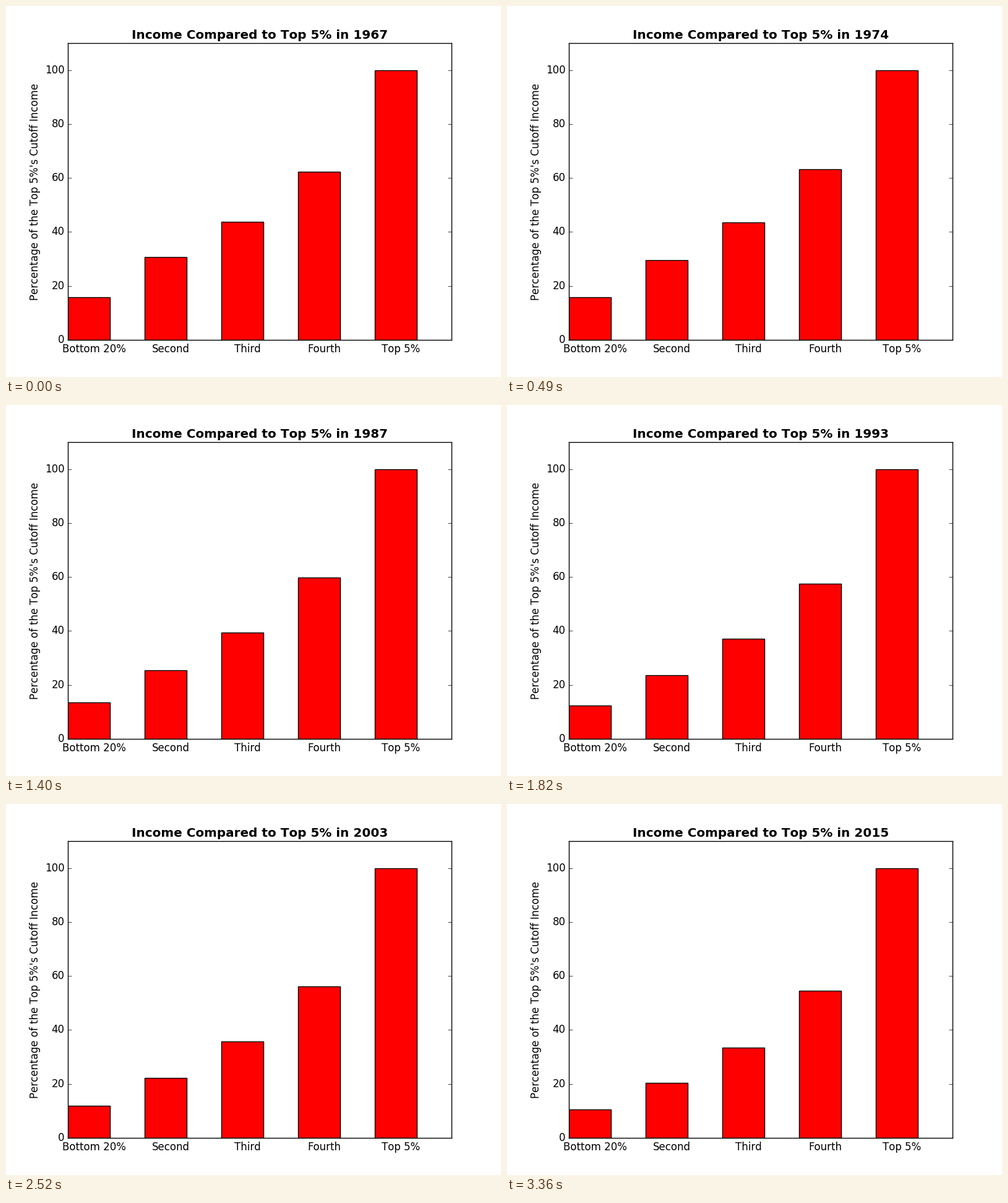
These frames come from a looping animation (800x600 px, 5950 ms). A matplotlib script:

```python
import numpy as np
import matplotlib.pyplot as plt
from matplotlib.animation import FuncAnimation

plt.style.use("classic")
plt.rcParams["font.family"] = "DejaVu Sans"
plt.rcParams["text.kerning_factor"] = 6  # kerning in whole pixels

FIRST, LAST = 1967, 2015
STEP_MS, FRAMES = 70, 85

# Turning points of each group, in percent of the top cutoff;
# the bars move in straight lines between them.
YEARS = [1967, 1968, 1974, 1981, 1993, 1998, 2008, 2015]
GROUPS = {
    "Bottom 20%": [15.79, 16.7, 15.8, 14.45, 12.39, 12.19, 11.51, 10.63],
    "Second": [30.7, 31.7, 29.55, 27.25, 23.58, 23.0, 21.67, 20.29],
    "Third": [43.72, 45.5, 43.5, 41.9, 37.07, 36.56, 34.85, 33.57],
    "Fourth": [62.32, 63.9, 63.2, 62.1, 57.57, 56.73, 55.69, 54.56],
    "Top 5%": [100] * len(YEARS),
}


def heights(year):
    return [np.interp(year, YEARS, points) for points in GROUPS.values()]


fig = plt.figure(figsize=(8, 6), dpi=100, facecolor="white")
ax = fig.add_axes([0.125, 0.1, 0.775, 0.8])
slots = np.arange(len(GROUPS))
bars = ax.bar(slots, heights(FIRST), width=0.55, align="edge",
              color="red", edgecolor="black", linewidth=1)
ax.set_xlim(0, 5)
ax.set_ylim(0, 110)
ax.set_xticks(slots + 0.34, list(GROUPS))
ax.set_yticks(range(0, 101, 20))
ax.tick_params(axis="x", bottom=False, top=False)
ax.set_ylabel("Percentage of the Top 5%'s Cutoff Income")
title = ax.set_title("", fontweight="bold")


def draw(i):
    year = min(FIRST + i, LAST)
    for bar, height in zip(bars, heights(year)):
        bar.set_height(height)
    title.set_text(f"Income Compared to Top 5% in {year}")
    return [*bars, title]


anim = FuncAnimation(fig, draw, frames=FRAMES, interval=STEP_MS,
                     repeat=True, repeat_delay=0, blit=False)
plt.show()
```
